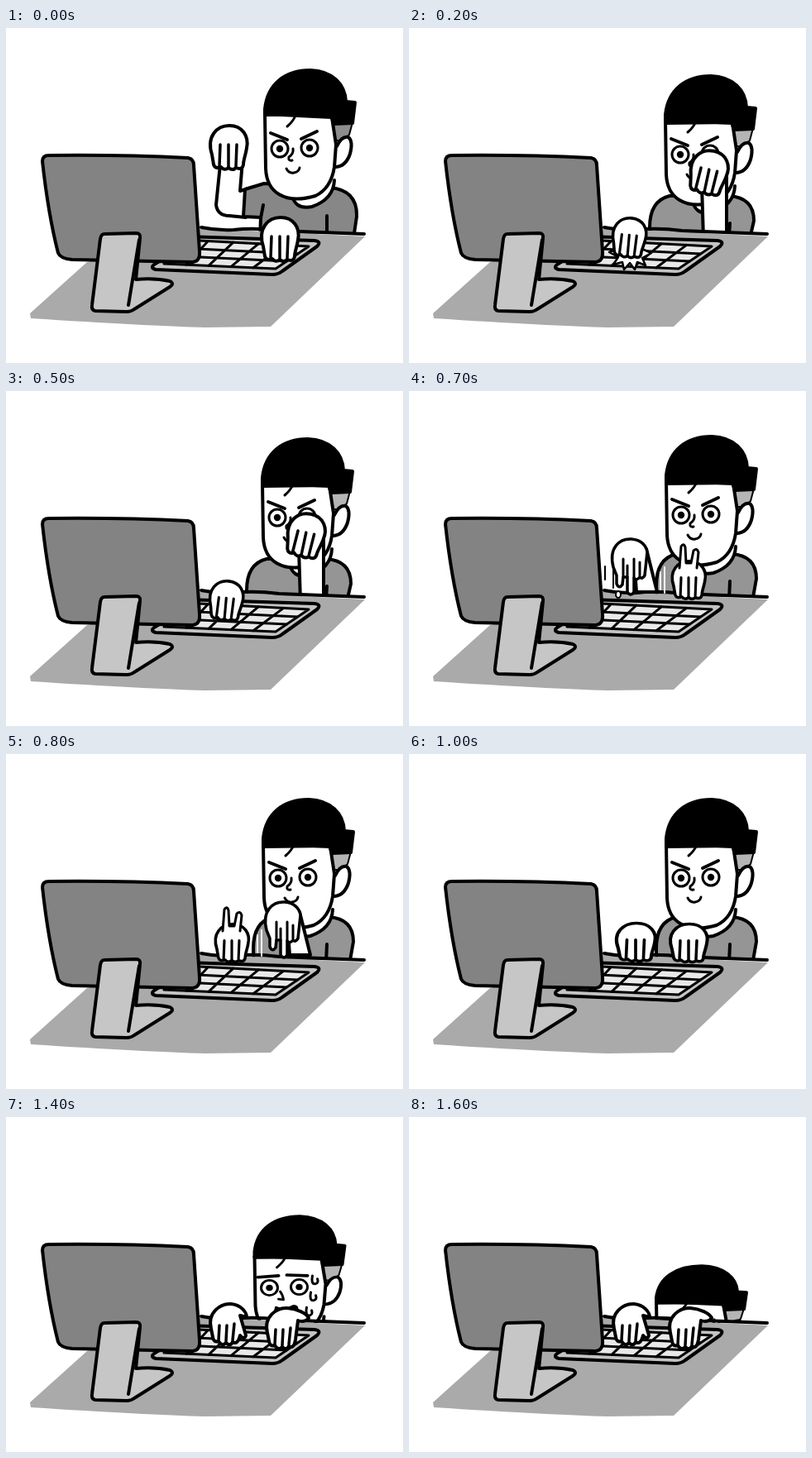
Write an HTML page that moves like this. It is 480 px wide and 405 px high and loops after 2000 ms.

```html
<!DOCTYPE html>
<html>
<head>
<meta charset="utf-8">
<title>Keyboard frenzy</title>
<style>
html, body { margin: 0; height: 100%; overflow: hidden; background: #fff; }
body > svg { display: block; width: 100vw; height: 100vh; stroke: #000; stroke-linecap: round; stroke-linejoin: round; }
</style>
</head>
<body>
<svg viewBox="0 0 480 405"></svg>
<script>
const stage = document.querySelector('svg');
const STEP = 100, LOOP = 2000;

const path = (d, fill = 'none', width = 4) => `<path d="${d}" fill="${fill}" stroke-width="${width}"/>`;
const group = (transform, ...parts) => `<g transform="${transform}">${parts.join('')}</g>`;
const at = (x, y, ...parts) => group(`translate(${x} ${y})`, ...parts);
// Hides whatever reaches below the back edge of the desk
const behindDesk = (...parts) => `<svg width="480" height="249">${parts.join('')}</svg>`;

// Desk, keyboard and monitor
function keyboard() {
  const cell = (u, v) => `${214 + 152 * u - v * (23 + 17 * u)} ${256 + 8 * u + v * (29 - 2 * u)}`;
  let lines = '';
  for (let i = 1; i < 5; i++) lines += `M${cell(i / 5, 0)}L${cell(i / 5, 1)}`;
  for (let j = 1; j < 3; j++) lines += `M${cell(0, j / 3)}L${cell(1, j / 3)}`;
  return path('M215 252L373 257Q382 258 376 264L334 294Q329 298 322 298L181 292Q174 290 179 286L200 273Z', '#c4c4c4') +
    path(`M${cell(0, 0)}L${cell(1, 0)}L${cell(1, 1)}L${cell(0, 1)}Z`, '#e9e9e9', 3) +
    path(lines, 'none', 3);
}

const scene =
  '<path d="M98 283L29 345L30 351Q170 360 240 362L320 361L434 252L236 242L200 260Z" fill="#aaa" stroke="none"/>' +
  path('M236 241Q255 245 275 244Q300 241 330 245L433 249') +
  keyboard() +
  path('M44 161Q44 154 52 154Q140 153 220 157Q227 158 227 166L234 270Q235 282 226 283L80 280Q66 279 63 272Q51 225 44 161Z', '#838383') +
  path('M119 249L157 248Q163 248 162 254L157 304Q180 302 198 306Q204 309 198 313L155 340Q151 343 146 343L108 342Q103 341 104 335L114 255Q115 249 119 249Z', '#c6c6c6') +
  path('M161 256L148 335');

// Hands
const fist = (x, y, more = '') => group(`translate(${x} ${y}) ${more}`,
  path('M-20 8C-27 -14 -14 -27 1 -27C17 -27 25 -14 22 0C21 8 18 14 18 20Q17 27 9 24Q5 28 0 24Q-5 28 -9 23Q-16 26 -18 20Z', '#fff'),
  path('M-10 -4L-11 22M0 -4V23M10 -4L9 22', 'none', 3.5));

const spread = (x, y, thumb) => at(x, y,
  path(`M-20 6C-25 -14 -8 -25 4 -24${thumb}Q12 26 6 22Q3 28 -2 23Q-7 28 -11 21Q-17 23 -18 16Z`, '#fff'),
  path('M-10 2L-11 20M-1 2L-2 21M8 0L6 20', 'none', 3.5));

const pointDown = (x, y) => at(x, y,
  path('M4 -14L20 -12L33 40H8Z', '#fff'),
  path('M-20 10C-26 -14 -12 -25 2 -24C14 -23 20 -16 21 -8L18 20Q15 25 12 22Q8 27 5 23V40Q1 46 -3 40V22H-8L-9 31Q-13 37 -16 30V20Z', '#fff', 3.5),
  path('M-8 0V22M-3 8V22M5 0V23M12 4V20', 'none', 3));

const pointUp = (x, y) => fist(x, y, 'scale(.9 .86)') + at(x, y,
  path('M-11 -15L-9 -41Q-6 -46 -4 -40L-3 -21H3L6 -36Q10 -40 12 -34L10 -15', '#fff', 3));

const restingFists = fist(274, 228, 'scale(1.05 .87)') + fist(338, 229, 'scale(1 .87)');
const typingHands =
  spread(268, 250, 'C16 -23 23 -14 23 -8L15 -10L22 14Q20 20 15 14') +
  spread(336, 255, 'C16 -23 27 -18 30 -12Q25 -6 17 -9L14 14');
const splash = (x, y) => at(x, y,
  path('M-25 -8L-14 -2L-20 7L-9 4L-7 13L0 5L6 13L9 4L19 8L15 -1L26 -7L10 -14H-10Z', '#fff', 2.5));

// Person
const eye = (x, y) => at(x, y, '<circle r="10" fill="#fff" stroke-width="3"/><circle r="4.2" stroke="none"/>');

const smile =
  path('M318 131L338 139M374 129L355 138') +
  path('M337 174Q340 180 346 179Q352 178 353 173M345 150Q346 156 340 160Q339 165 344 164', 'none', 3);

const worry =
  path('M315 136L340 134M350 133L375 134') +
  path('M342 155Q345 159 346 166L340 165', 'none', 3) +
  path('M337 176Q347 181 358 174Q365 174 361 183Q353 193 342 189Q334 184 337 176Z', '#000', 3) +
  '<ellipse cx="350" cy="184" rx="7" ry="3.5" fill="#ccc" stroke="none"/>' +
  [[384, 140], [382, 162], [377, 182]].map(([x, y]) =>
    path(`M${x - 3} ${y - 6}Q${x - 5} ${y + 5} ${x} ${y + 5}Q${x + 5} ${y + 4} ${x + 3} ${y - 2}`, '#fff', 3)).join('');

const head = (x, y, mood, brow = 113, side = '#b5b5b5') => at(x, y,
  path('M344 203Q345 224 368 220Q394 211 395 188', '#fff'),
  path('M391 114L417 118L413 133L405 140H396Z', side, 2),
  path('M398 147Q404 134 412 136Q418 141 414 156Q409 171 397 172', '#fff'),
  path('M311 108L312 174Q313 196 328 205Q345 215 372 207Q391 198 395 172L397 145L392 112Z', '#fff'),
  path(`M311 ${brow - 1}V102C314 72 335 55 366 55C393 56 408 72 409 93L420 94L417 119L394 120L391 ${brow - 2}Z`, '#000'),
  path('M348 110Q345 117 338 123', 'none', 3),
  eye(329, 150), eye(365, 149), mood);

const body = (left, right, top) =>
  path(`M${left} 255V${top + 38}Q${left} ${top + 6} ${left + 24} ${top}H${right - 30}Q${right} ${top + 2} ${right} ${top + 30}L${right - 5} 255Z`, '#959595') +
  path(`M388 ${top + 33}L387 252`);

// Poses
const raisedLeft = hit =>
  behindDesk(
    path('M259 165L254 214Q256 227 270 227L290 229L300 192L283 197L286 160Z', '#fff'),
    fist(269, 145),
    path('M312 188L289 195L287 228L308 229L307 255H420L424 228Q425 196 392 193Z', '#878787'),
    path('M311 214L308 230M388 227V250'),
    head(2, -4, smile, 110, '#8d8d8d')) +
  scene + (hit ? splash(333, 284) : '') + fist(331, 256);

const raisedRight = hit =>
  behindDesk(
    body(291, 417, 203), head(-1, 3, smile),
    path('M354 190L356 255H384L384 178Z', '#fff'),
    fist(362, 175, 'rotate(12)')) +
  scene + (hit ? splash(267, 279) : '') + fist(266, 254, 'rotate(5) scale(.9 .9)');

const calm = behindDesk(body(299, 420, 197), head(0, 0, smile)) + scene;

const strokes = (x, color) => `<g stroke="${color}">${path(`M${x} 213V244M${x - 5} 219V240`, 'none', 2)}</g>`;
const poking = leftDown => calm + (leftDown
  ? pointDown(267, 203) + pointUp(338, 229) + path('M237 212V228M247 212V238', 'none', 2) +
    strokes(309, '#fff') + '<ellipse cx="253" cy="246" rx="3" ry="4" fill="#fff" stroke-width="2"/>'
  : pointUp(273, 229) + pointDown(335, 203) + strokes(309, '#fff'));

// The head bows as it drops, so it also gets shorter
const sinking = amount => behindDesk(
  at(0, 120 * amount, body(291, 425, 194)),
  group(`translate(${-3 * amount} ${60 + 120 * amount}) scale(1 ${1 - .18 * amount})`,
    head(-9, -55, worry, 111))) +
  scene + typingHands;

const poses = [
  raisedLeft(false), raisedRight(false), raisedRight(true), raisedLeft(false), raisedLeft(true),
  raisedRight(false), raisedRight(true),
  poking(true), poking(false), poking(true),
  calm + restingFists, calm + typingHands,
  ...[0, .25, .5, .75, 1].map(sinking)
];

let shown = -1;
function draw() {
  const index = Math.min(poses.length - 1, Math.floor(performance.now() % LOOP / STEP));
  if (index !== shown) stage.innerHTML = poses[shown = index];
  requestAnimationFrame(draw);
}
draw();
</script>
</body>
</html>
```
